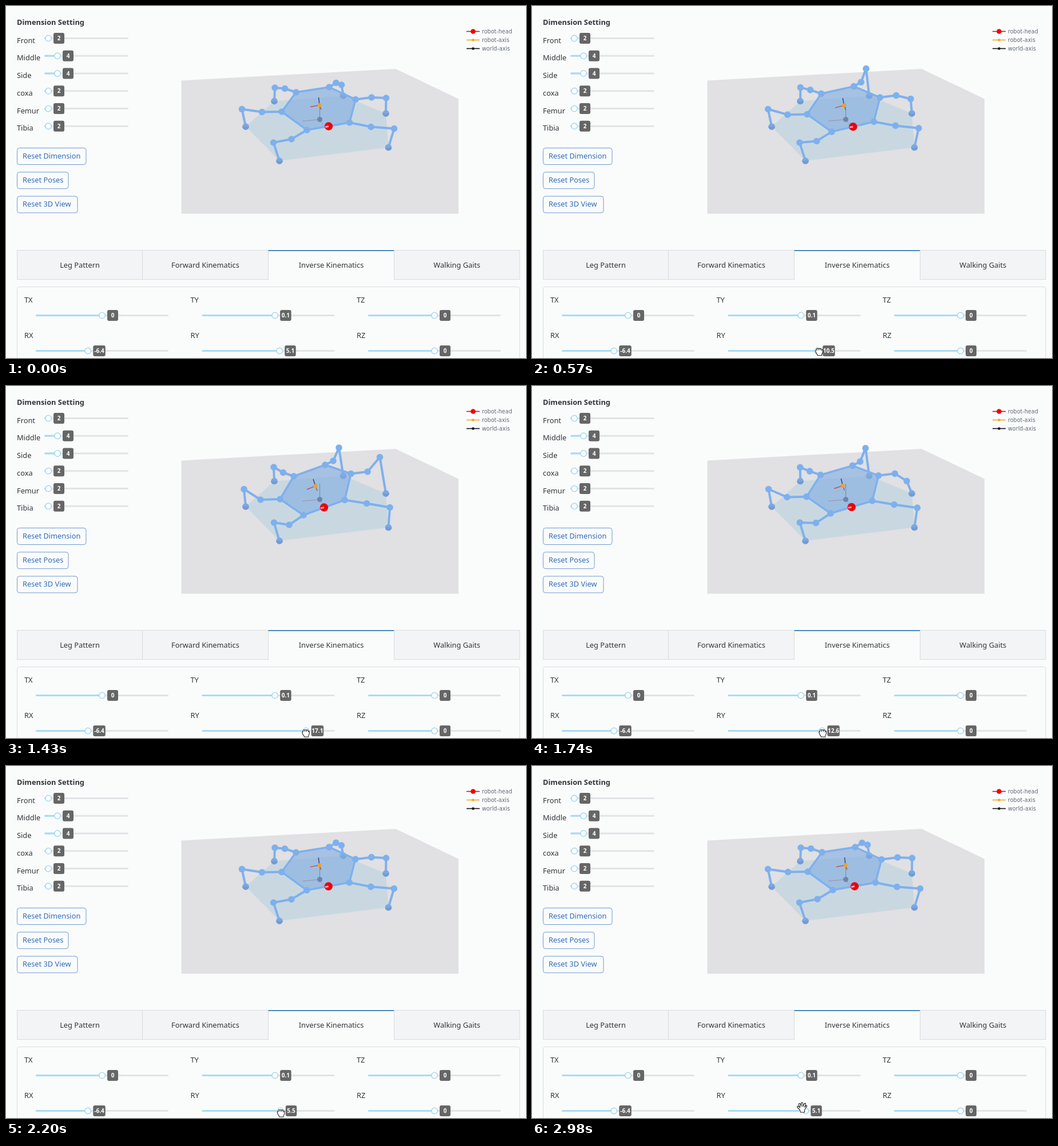
Write an HTML page that moves like this. It is 909 by 616 pixels and loops after 3060 ms.

```html
<!DOCTYPE html>
<html lang="en">
<head>
<meta charset="utf-8">
<title>Hexapod inverse kinematics</title>
<style>
html, body { margin: 0; width: 100%; height: 100%; overflow: hidden; background: #fafcfc; }
svg { display: block; font: 12.8px "Noto Sans", "Open Sans", sans-serif; fill: #323438; }
.legend { font: 9.6px "DejaVu Sans", sans-serif; fill: #626a78; }
.badge { font-size: 10px; font-weight: 600; fill: #fff; text-anchor: middle; }
.mid { text-anchor: middle; }
.title { font-weight: 600; }
.button { fill: #3069b9; }
</style>
</head>
<body>
<svg width="909" height="616" viewBox="0 0 909 616">
  <g id="page"></g><g id="robot"></g><g id="control"></g>
</svg>
<script>
const LOOP = 3060, BLUE = '#7eb0ee';
const $ = id => document.getElementById(id);

const text = (x, y, s, cls = '') => `<text x="${x}" y="${y}" class="${cls}">${s}</text>`;
const rect = (x, y, w, h, attrs) => `<rect x="${x}" y="${y}" width="${w}" height="${h}" ${attrs}/>`;
const dot = ([x, y], r, fill) => `<circle cx="${x}" cy="${y}" r="${r}" fill="${fill}"/>`;
const poly = (pts, fill, attrs = '') => `<polygon points="${pts.join(' ')}" fill="${fill}" ${attrs}/>`;
const line = (pts, color, w) =>
  `<polyline points="${pts.join(' ')}" fill="none" stroke="${color}" stroke-width="${w}" stroke-linejoin="round"/>`;

function slider(x, y, width, handle, value) {
  const label = String(value);
  const w = label.length > 3 ? 21.5 : label.length > 1 ? 19.5 : 19;
  const left = handle + 9;
  return rect(x, y - 1.5, width, 3, 'rx="1.5" fill="#e2e3e5"') +
    rect(x, y - 1.5, handle - x, 3, 'rx="1.5" fill="#a6dcf3"') +
    `<circle cx="${handle}" cy="${y}" r="5.2" fill="#fff" stroke="#a3d9f1" stroke-width="1.5"/>` +
    rect(left, y - 9.5, w, 19, 'rx="3" fill="#666"') +
    text(left + w / 2, y + 3.6, label, 'badge');
}
const wideSlider = (x, y, value, range) => slider(x, y, 232, x + 116 + value / range * 116, value);

function page() {
  let s = text(19, 33, 'Dimension Setting', 'title');
  [['Front', 2], ['Middle', 4], ['Side', 4], ['coxa', 2], ['Femur', 2], ['Tibia', 2]].forEach(([name, v], i) => {
    const y = 56.5 + 30.75 * i;
    s += text(19, y + 8, name) + slider(67, y, 147, 58 + 8 * v, v);
  });
  [['Reset Dimension', 120.5], ['Reset Poses', 89.5], ['Reset 3D View', 105.5]].forEach(([name, w], i) => {
    const y = 248.5 + 42.2 * i;
    s += rect(19.5, y, w, 29, 'rx="4" fill="none" stroke="#7399d0"') + text(29, y + 18.5, name, 'button');
  });

  s += poly([[306.5, 130.5], [681, 110], [791, 162.5], [791, 363.5], [306.5, 363.5]], '#e1e0e2');
  [['robot-head', '#ee0010', 4.3], ['robot-axis', '#f5a427', 2.3], ['world-axis', '#111', 2.3]].forEach(([name, color, r], i) => {
    const y = 44.5 + 15 * i;
    s += line([[805, y], [828, y]], color, 1.6) + dot([816.5, y], r, color) + text(832, y + 3.5, name, 'legend');
  });

  const edges = [19.5, 238.5, 458.5, 678.5, 898];
  ['Leg Pattern', 'Forward Kinematics', 'Inverse Kinematics', 'Walking Gaits'].forEach((name, i) => {
    const x = edges[i], w = edges[i + 1] - x, active = i === 2;
    s += active
      ? rect(x, 427, w, 2, 'fill="#4b8bbd"')
      : rect(x, 427.5, w, 51, 'fill="#f3f4f6" stroke="#d8dade"');
    s += text(x + w / 2, active ? 458 : 457.5, name, 'mid');
  });
  s += rect(19.5, 491.5, 878.5, 200, 'rx="4" fill="none" stroke="#d8dade"');
  [32, 322.5, 613].forEach((x, i) => {
    s += text(x, 518.5, 'T' + 'XYZ'[i]) + text(x, 580.5, 'R' + 'XYZ'[i]);
  });
  return s + wideSlider(52, 541.5, 0, 1) + wideSlider(342.5, 541.5, 0.1, 1) + wideSlider(633, 541.5, 0, 1) +
    wideSlider(52, 603.5, -6.4, 30) + wideSlider(633, 603.5, 0, 30);
}

const mix = (a, b, u) => a + (b - a) * u;
const move = (x0, y0, x1, y1) => u => [mix(x0, x1, u), mix(y0, y1, u)];

// Each leg: hip, coxa end, knee, foot; the knees of two legs snap upward.
const LEGS = [
  [move(507, 151, 503, 158), move(487.5, 144.5, 484.5, 151.5), move(470, 143, 468, 142), [469, 166.5]],
  [move(565, 142, 558, 138), move(577, 134.5, 572, 131),
    u => u < 0.3 ? [586.5 - 6 * u, 138 + 26 * u] : move(585, 110.5, 582, 108)(u), [589.5, 157]],
  [move(611, 163.5, 603, 153.5), move(639, 160, 632, 150),
    u => u < 0.85 ? [664.5 - 21 * u * u, 161 + 12 * u * u] : [653.5, 124.5], [664, 188]],
  [move(600.5, 204, 592, 199.5), move(638, 211.5, 630.5, 205.5), move(678.5, 214.5, 671, 212.5), [668.5, 247.5]],
  [move(526, 217, 520, 226), move(499, 233, 495, 243), move(467.5, 239, 468.5, 239), [478, 271]],
  [move(482, 185, 479, 198), move(447.5, 185.5, 445, 199), u => [412.5 + 3.5 * u ** 3, 180.5], [419, 211]]
];
const ROBOT_AXIS = [
  [move(546.5, 160, 537, 163), '#34406e'],
  [move(532, 176.5, 526, 181), '#b95559'],
  [move(551, 181.5, 544, 183.5), '#8b6442']
];

function robot(u) {
  const legs = LEGS.map(([hip, coxa, knee, foot]) => [hip(u), coxa(u), knee(u), foot]);
  const hips = legs.map(leg => leg[0]);
  const drawLeg = leg => line(leg, BLUE, 4) + leg.slice(0, 3).map(p => dot(p, 5.8, BLUE)).join('') +
    dot(leg[3], 5.8, '#7ba8e2') +
    `<path d="M${leg[3][0] - 5.8} ${leg[3][1]}a5.8 5.8 0 0 0 11.6 0z" fill="#729cd4"/>`;
  const center = move(548, 173.5, 541, 175)(u);
  const head = move(564, 210.5, 556, 212.5)(u);
  const world = [548.5, 198.5];

  return poly(legs.map(leg => leg[3]), '#a6cbdc', 'fill-opacity=".4"') +
    drawLeg(legs[0]) + drawLeg(legs[1]) +
    line([world, [555, 209]], '#8798b0', 1) +
    poly(hips, '#83afe3', 'fill-opacity=".62"') +
    poly(hips, 'none', `stroke="${BLUE}" stroke-width="3.5" stroke-linejoin="round"`) +
    legs.slice(2).map(drawLeg).join('') +
    line([world, [548.5, 171]], '#7d80b5', 1) + line([world, [518, 201.5]], '#a18ba6', 1) +
    dot(world, 4.5, '#7084aa') +
    ROBOT_AXIS.map(([tip, color]) => line([center, tip(u)], color, 1.4)).join('') +
    dot(center, 3.6, '#e6a23c') +
    dot(head, 7.2, '#f00008') +
    line([[head[0] - 6, head[1] + 1.2], [head[0], head[1] + 0.1]], '#e0a0bd', 3);
}

const HANDS = {
  fist: 'M-5 1C-7-1-5-3-4-2V-4C-4-6-1-6-1-4C-1-6 2-6 2-4C3-6 5-5 5-3C7-4 7-2 7-1C7 3 5 4 5 7H-2C-2 5-5 4-5 1ZM-1-4V-2M2-4V-2M5-3V-1',
  open: 'M-4 3L-7 0C-9-2-7-4-5-2L-3 0L-5-5C-6-8-3-8-2-6L-1-2V-7C-1-10 2-10 2-7V-2L4-6C5-9 7-8 7-6L5-1L7-3C9-5 10-3 8-1L5 4V8H-2C-2 6-3 5-4 3Z'
};
const hand = (x, y, kind) =>
  `<path transform="translate(${x} ${y})" d="${HANDS[kind]}" fill="#fff" stroke="#222" stroke-width="1.1" stroke-linejoin="round"/>`;

// Bursts of evenly spaced picture updates: start, end, count.
const BURSTS = [[160, 650, 7], [720, 1190, 7], [1270, 1740, 7], [1830, 2280, 7], [2370, 2830, 7], [2910, 2980, 2]];
const STEPS = BURSTS.flatMap(([a, b, n]) =>
  Array.from({ length: n }, (_, i) => a + Math.floor((b - a) * i / (n - 1) / 10) * 10));

function track(keys, t) {
  const i = keys.findIndex(k => k[0] > t);
  if (i === 0) return keys[0][1];
  if (i < 0) return keys.at(-1)[1];
  const [a, b] = [keys[i - 1], keys[i]];
  return mix(a[1], b[1], (t - a[0]) / (b[0] - a[0]));
}
const ANGLE = [[0, 5.1], [160, 5.5], [320, 7.3], [870, 14.7], [1420, 17.1], [1740, 12.6], [2200, 5.5], [2280, 5.1]];
const TILT = [[160, 0], [320, 0.033], [870, 0.75], [1420, 1], [1740, 0.667], [2200, 0.033], [2280, 0]];
const HAND_X = [[160, 480], [320, 490], [870, 516], [1420, 523.5], [1740, 507.5], [2200, 480], [2750, 479], [2980, 471.5]];
const HAND_Y = [[160, 603.5], [320, 604], [870, 605], [1420, 607], [2750, 607], [2980, 598]];

function frame(now) {
  const t = now % LOOP;
  const step = STEPS.findLast(s => s <= t) ?? 0;
  const angle = Math.round(track(ANGLE, step) * 10) / 10;
  $('robot').innerHTML = robot(track(TILT, step));
  $('control').innerHTML = wideSlider(342.5, 603.5, angle, 30) +
    (step ? hand(track(HAND_X, step), track(HAND_Y, step), step < 2740 ? 'fist' : 'open') : '');
}

$('page').innerHTML = page();
const start = performance.now();
(function tick() {
  frame(performance.now() - start);
  requestAnimationFrame(tick);
})();
</script>
</body>
</html>
```
